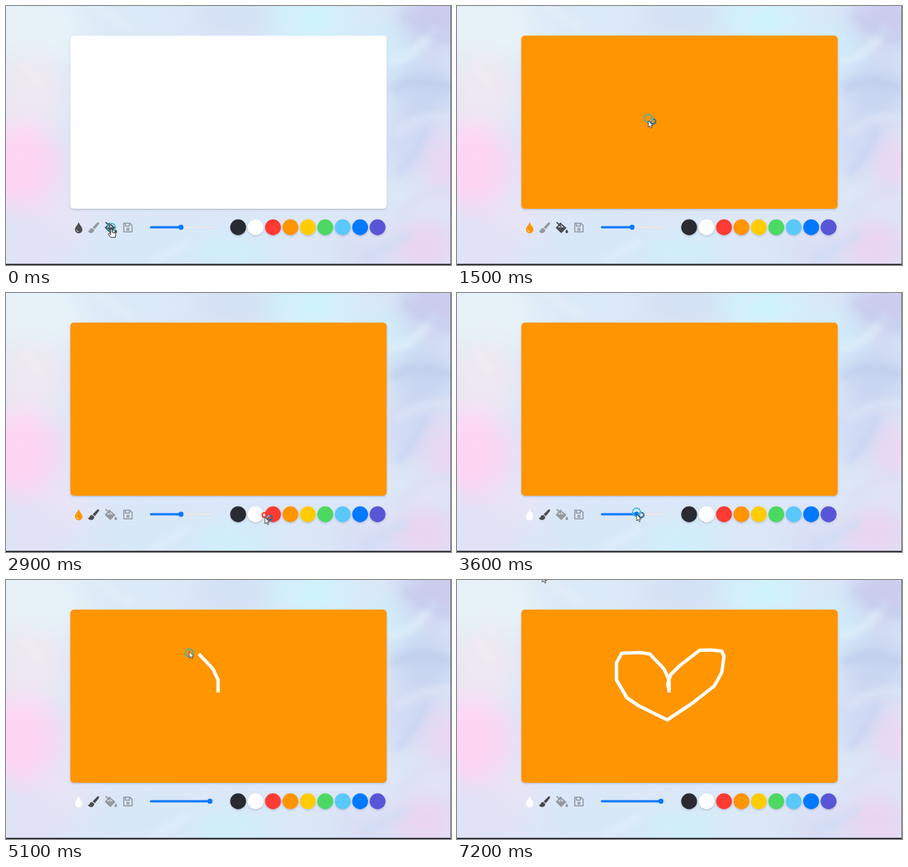
An HTML page that plays this animation: 600x350 px, repeating every 7300 ms.

```html
<!DOCTYPE html>
<html lang="en">
<head>
<meta charset="utf-8">
<title>Paint board</title>
<style>
html, body { margin: 0; width: 100%; height: 100%; overflow: hidden; }
svg { display: block; width: 100vw; height: 100vh; }
</style>
</head>
<body>
<svg viewBox="0 0 600 350" preserveAspectRatio="none">
  <defs>
    <filter id="soft" x="-60%" y="-60%" width="220%" height="220%"><feGaussianBlur stdDeviation="18"/></filter>
    <filter id="dab" x="-30%" y="-30%" width="160%" height="160%"><feGaussianBlur stdDeviation="4"/></filter>
    <filter id="shade" x="-20%" y="-20%" width="140%" height="150%">
      <feDropShadow dx="0" dy="1.2" stdDeviation="1.2" flood-color="#46466e" flood-opacity=".28"/>
    </filter>
  </defs>
  <rect width="600" height="350" fill="#dce7f7"/>
  <g id="wash" filter="url(#soft)"></g>
  <g id="dabs" filter="url(#dab)" fill="none" stroke-linecap="round"></g>
  <path d="M0 349.2H600" stroke="#17171c" stroke-width="1.5"/>
  <path d="M599.6 0V350" stroke="#55556a" stroke-width=".8"/>

  <rect id="board" x="86.7" y="40" width="426.6" height="234" rx="5" filter="url(#shade)"/>
  <polyline id="stroke" fill="none" stroke="#fff" stroke-width="4.6" stroke-linejoin="round"/>

  <g id="drop">
    <path d="M98 291.8C97 296 93 298.5 93 302.2a5 5 0 0 0 10 0C103 298.5 99 296 98 291.8z"/>
    <path d="M95.3 302.4a2.7 2.7 0 0 0 2.7 2.6" fill="none" stroke="#fff" stroke-opacity=".75"/>
  </g>
  <g id="brush">
    <path d="M125 292.5c1 .8.4 2-.3 3l-5 6.2c-.7-1.2-1.8-2-3.2-2.3l6.3-6.3c.8-.8 1.6-1.1 2.2-.6z"/>
    <path d="M115.6 300.3c2 0 3.4 1.4 3.3 3.1-.2 2.4-2.5 3.4-4.6 3.4-2.2 0-3.6-1.2-3.8-3.2 1.8.8 2-.6 2.4-1.6.4-1 1.3-1.7 2.7-1.7z"/>
  </g>
  <g id="bucket">
    <path d="M134.8 292.6L140 297.8M139 293.6L146.4 300L140.6 305.8L134.2 299.6L140 293.8" fill="none" stroke-width="1.7" stroke-linejoin="round" stroke-linecap="round"/>
    <path d="M134 299.4H147L140.6 306z" stroke-width=".8"/>
    <path d="M148 301.8c-.9 1.5-1.8 2.4-1.8 3.4a1.8 1.8 0 0 0 3.6 0c0-1-.9-1.9-1.8-3.4z" stroke="none"/>
  </g>
  <g fill="none" stroke="#959ba5" stroke-width="1.5" stroke-linejoin="round">
    <path d="M158.8 293.6H167L170 296.6V305.3H158.8z"/>
    <path d="M161 294V297.6H166.4V294"/>
    <circle cx="164.4" cy="301.7" r="1.5"/>
  </g>

  <rect x="194" y="297.5" width="84" height="3" rx="1.5" fill="#ebebef" stroke="#d2d2dc" stroke-width=".4"/>
  <rect id="level" x="194" y="297.5" height="3" rx="1.5" fill="#0579ff"/>
  <circle id="thumb" cy="299" r="3.4" fill="#0579ff"/>
  <g id="palette"></g>

  <g id="cursor">
    <g id="rings" fill="none">
      <circle id="ring"/>
      <g id="busy" transform="translate(6.5 1)">
        <circle r="3.3" stroke="#2b6f9b" stroke-width="2"/>
        <path d="M-3.3 0A3.3 3.3 0 0 1 0 -3.3" stroke="#6fc6ea" stroke-width="1.5"/>
      </g>
    </g>
    <path id="arrow" d="M0 0V8.8L2 7L3.5 10.2L5 9.5L3.6 6.5H6.2z" fill="#fff" stroke="#333" stroke-width=".8"/>
    <path id="hand" d="M-1 .5C-.9-1 1-1 1.2.5V4L5 4.8Q6.2 5.2 6 7L5.3 10.7H-.8L-4 6.5C-4.2 5.2-2.8 5-2 6L-1 7z" fill="#fff" stroke="#222" stroke-width=".9" stroke-linejoin="round"/>
  </g>
</svg>
<script>
const LOOP = 7300, STEP = 100;
const DARK = "#4b4b50", DIM = "#959a9f", ORANGE = "#ff9500";
const COLORS = ["#2c2c30", "#fff", "#ff3b30", ORANGE, "#ffcc00", "#4cd964", "#5ac8fa", "#0579ff", "#5856d6"];
const PICK_ORANGE = 700, FILL = 1400, PICK_BRUSH = 2300, PICK_WHITE = 3200;
const DRAG = [3500, 3900], DRAW = [4700, 6800];

const $ = id => document.getElementById(id);
const set = (el, attrs) => { for (const k in attrs) el.setAttribute(k, attrs[k]); return el; };
const add = (parent, tag, attrs) =>
  parent.appendChild(set(document.createElementNS("http://www.w3.org/2000/svg", tag), attrs));
const within = (t, [a, b]) => t >= a && t <= b;
const show = (id, on) => set($(id), { visibility: on ? "visible" : "hidden" });

// Watercolour: cx, cy, rx, ry, colour
[
  [40, 30, 80, 55, "#e7f2f8"], [20, 215, 55, 60, "#ffd5f4"], [35, 115, 50, 50, "#eee8f2"],
  [175, 15, 75, 30, "#dbeaf8"], [310, 12, 60, 30, "#d3e1f5"], [410, 18, 55, 30, "#cdf4fd"],
  [510, 55, 40, 40, "#d2edfa"], [580, 15, 50, 40, "#cbcbed"], [565, 115, 45, 45, "#c8d5f0"],
  [540, 190, 40, 35, "#d0daf4"], [590, 215, 28, 45, "#ecd7f1"], [565, 325, 45, 35, "#ebd3f1"],
  [480, 335, 50, 25, "#d9dcf5"], [390, 335, 60, 25, "#dae8f8"], [300, 335, 55, 25, "#cdf0fb"],
  [190, 325, 70, 35, "#d6e8f8"], [35, 325, 50, 35, "#e2e1f6"], [80, 285, 35, 25, "#e9e4f6"]
].forEach(([cx, cy, rx, ry, fill]) => add($("wash"), "ellipse", { cx, cy, rx, ry, fill }));

[
  ["M520 75Q550 70 575 35", "#e2f0fb", 12], ["M540 15Q570 40 595 45", "#c3cdec", 12],
  ["M525 110Q555 95 595 110", "#bfcdec", 14], ["M530 170Q560 145 600 150", "#dfe5f8", 12],
  ["M530 225Q550 205 565 170", "#c6d4f1", 12], ["M535 280Q565 240 600 250", "#dcdff6", 14],
  ["M120 0L165 30", "#e5eff9", 14], ["M375 35L400 0", "#d9edfb", 12],
  ["M25 80L45 105", "#f2edf4", 12], ["M200 345L245 320", "#e1effa", 12],
  ["M485 340L540 310", "#cbdcf5", 10]
].forEach(([d, stroke, w]) => add($("dabs"), "path", { d, stroke, "stroke-width": w, opacity: .65 }));

const swatchX = i => 313 + 23.5 * i;
COLORS.forEach((fill, i) =>
  add($("palette"), "circle", { cx: swatchX(i), cy: 299, r: 10.7, fill, filter: "url(#shade)" }));

const heart = [
  [286, 152], [286, 135], [279, 120], [260, 100], [247, 98], [222, 99], [215, 112], [215, 135],
  [229, 159], [245, 170], [283.5, 189], [318, 166], [347, 143], [357, 125], [360, 103], [357, 96],
  [341, 94.5], [327, 95], [300, 116], [288, 128], [284, 141], [286, 148]
];
const keys = [
  [0, 142, 302], [200, 142, 302], [600, 383, 301], [800, 383, 301], [1400, 258, 155], [1600, 258, 155],
  [2200, 118, 300], [2400, 118, 300], [2900, 349, 303], [3100, 337, 301], [3300, 337, 301],
  [3500, 236, 299], [3900, 275, 299], [4000, 275, 299], [4200, 269, 118], [4500, 286, 152],
  ...heart.map(([x, y], i) => [DRAW[0] + i * STEP, x, y]),
  [6900, 286, 148], [7200, 115, -6], [LOOP, 115, -6]
];

function pointer(t) {
  const i = Math.max(1, keys.findIndex(k => k[0] > t));
  const [t0, x0, y0] = keys[i - 1], [t1, x1, y1] = keys[i];
  const u = (t - t0) / (t1 - t0), e = u * u * (3 - 2 * u);
  return [x0 + (x1 - x0) * e, y0 + (y1 - y0) * e];
}

function render(t) {
  const drawing = within(t, DRAW);
  const pressed = drawing || within(t, DRAG) ||
    [0, PICK_ORANGE, FILL, PICK_BRUSH, PICK_WHITE].some(p => t >= p && t <= p + STEP);
  const brushOn = t >= PICK_BRUSH;
  const bucketColor = brushOn ? DIM : DARK;

  set($("board"), { fill: t < FILL ? "#fefdff" : ORANGE });
  set($("drop"), { fill: t < PICK_ORANGE ? DARK : t < PICK_WHITE ? ORANGE : "#fff" });
  set($("brush"), { fill: brushOn ? DARK : DIM });
  set($("bucket"), { fill: bucketColor, stroke: bucketColor });

  const drag = Math.min(1, Math.max(0, (t - DRAG[0]) / (DRAG[1] - DRAG[0])));
  const thumb = 236 + 39 * drag * drag * (3 - 2 * drag);
  set($("level"), { width: thumb - 194 });
  set($("thumb"), { cx: thumb });

  // ink trails the pointer by one step
  const count = Math.max(0, Math.floor((t - DRAW[0]) / STEP));
  set($("stroke"), { points: heart.slice(0, count).join(" ") });

  const [x, y] = pointer(t);
  const onTool = Math.abs(y - 299) < 8 && x > 110 && x < 172;
  const onSwatch = COLORS.some((c, i) => Math.hypot(x - swatchX(i), y - 299) < 10.7);
  const hand = onTool || onSwatch;
  set($("cursor"), { transform: `translate(${x} ${drawing ? y - 1.5 : y})` });
  show("rings", y > 20);
  show("busy", y > 20 && !drawing && !hand);
  show("arrow", !hand);
  show("hand", hand);
  set($("ring"), pressed
    ? { cx: 0, cy: drawing ? 2 : -3, r: 5.3, stroke: "#27b5c9", "stroke-width": 1.9, "stroke-dasharray": "2.2 .8" }
    : { cx: -.5, cy: -3, r: 3.1, stroke: "#f03a20", "stroke-width": 1.9, "stroke-dasharray": "none" });
}

const start = performance.now();
function tick() {
  const t = (performance.now() - start) % LOOP;
  render(Math.floor(t / STEP) * STEP);
  requestAnimationFrame(tick);
}
tick();
</script>
</body>
</html>
```
